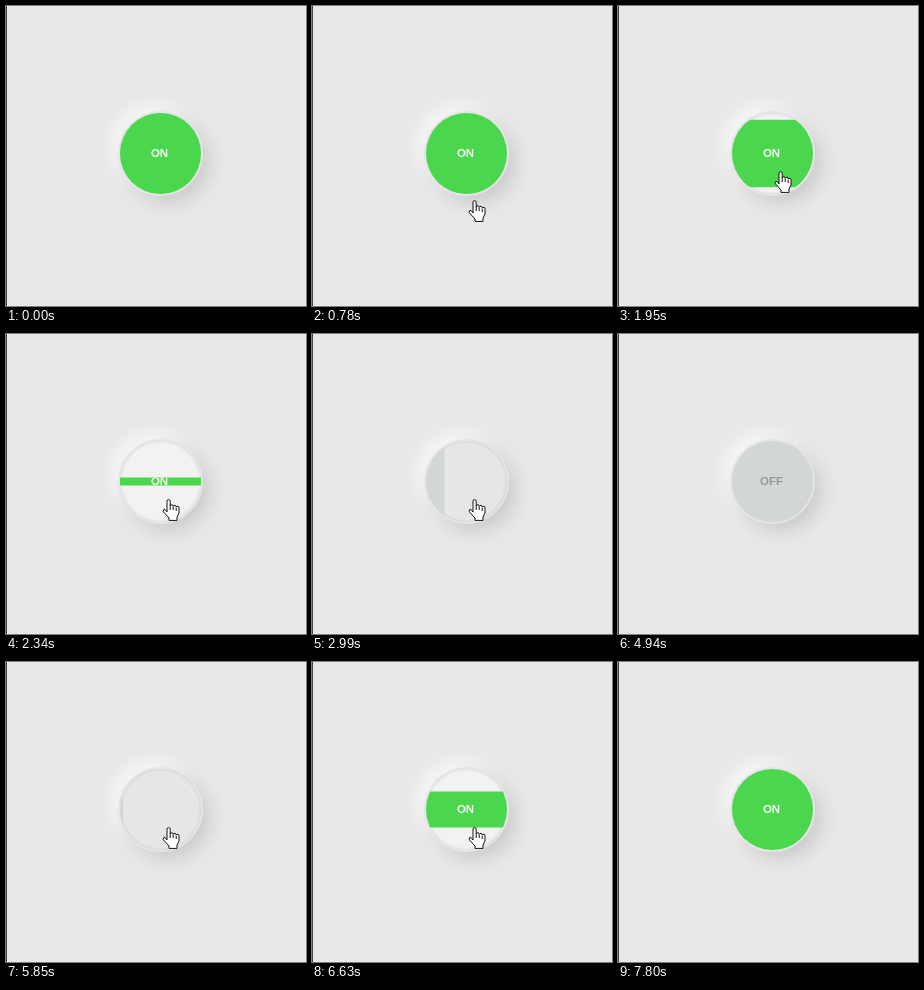
Recreate the animation shown at these times as an HTML page. Size 300x300 px, loop 7.93 s.

```html
<!DOCTYPE html>
<html lang="en">
<head>
<meta charset="utf-8">
<title>Soft toggle button</title>
<style>
  html, body { margin: 0; width: 100%; height: 100%; overflow: hidden; background: #e8e8e8; }
  #edge { position: absolute; left: 0; top: 0; width: 1px; height: 100%; background: #444; }
  #button {
    position: absolute; left: 114px; top: 107px; width: 81px; height: 81px; border-radius: 50%;
    box-shadow: 0 0 0 2px #e4e5e4, 8px 8px 20px rgba(0, 0, 0, .14), -8px -8px 20px rgba(255, 255, 255, .7);
  }
  .face {
    position: absolute; inset: 0; border-radius: 50%; text-align: center; text-indent: -2px;
    font: bold 11.5px/81px "Liberation Sans", Arial, sans-serif;
  }
  #base { box-shadow: inset 0 0 3px rgba(0, 0, 0, .14); }
  #on { background: #4ad74d; color: #f4fff4; }
  #off { background: #d2d6d5; color: #969a99; }
  #hand { position: absolute; left: 0; top: 0; overflow: visible; }
</style>
</head>
<body>
<div id="edge"></div>
<div id="button">
  <div class="face" id="base"></div>
  <div class="face" id="off">OFF</div>
  <div class="face" id="on">ON</div>
</div>
<svg id="hand" width="18" height="22" stroke="#111" stroke-linejoin="round">
  <path fill="#fff" d="M5 13V2.2a1.6 1.6 0 0 1 3.2 0V7a1.5 1.5 0 0 1 3 .5a1.5 1.5 0 0 1 3 .8a1.4 1.4 0 0 1 2.8 .9V14L15 18v3.4H7V19L1.2 12.6Q.8 10 3 10.4Z"/>
  <path fill="none" d="M8.2 7v4M11.2 8v3M14.2 9v3"/>
</svg>
<script>
  const LOOP = 7930, STEP = 130, SLIDE = 800;
  const [base, on, off, hand] = ['base', 'on', 'off', 'hand'].map(id => document.getElementById(id));

  const ramp = (t, start, length) => Math.min(1, Math.max(0, (t - start) / length));
  const mix = (a, b, p) => a + (b - a) * p;

  // The CSS "ease" curve, cubic-bezier(.25, .1, .25, 1)
  const bezier = (a, b, u) => 3 * a * u * (1 - u) ** 2 + 3 * b * u * u * (1 - u) + u ** 3;
  function ease(x) {
    let low = 0, high = 1;
    for (let i = 0; i < 20; i++) {
      const mid = (low + high) / 2;
      if (bezier(.25, .25, mid) < x) low = mid; else high = mid;
    }
    return bezier(.1, 1, high);
  }
  const slide = (t, start) => ease(ramp(t, start, SLIDE));

  function handAt(t) {
    if (t < 390 || t >= 7410 || (t >= 4940 && t < 5330)) return null;
    if (t < 6890) {
      const left = (1 - ramp(t, 390, 780)) ** 2;
      return [156, 165 + 115 * left];
    }
    const gone = ramp(t, 6890, 390) ** 2;
    return [156 - 58 * gone, 165 + 82 * gone];
  }

  function draw(now) {
    const t = Math.floor(now % LOOP / STEP) * STEP;

    const green = 1 - slide(t, 1838) + slide(t, 6416);
    const grey = slide(t, 2854) - slide(t, 5250);
    on.style.clipPath = `inset(${50 * (1 - green)}% 0)`;
    off.style.clipPath = `inset(0 ${100 * (1 - grey)}% 0 0)`;

    const dim = ramp(t, 2600, 250) - ramp(t, 6050, 350);
    const tint = mix(242, 231, dim);
    base.style.background = `rgb(${mix(242, 229, dim)}, ${tint}, ${tint})`;

    const spot = handAt(t);
    hand.style.visibility = spot ? 'visible' : 'hidden';
    if (spot) hand.style.transform = `translate(${spot.map(Math.round).join('px, ')}px)`;

    requestAnimationFrame(() => draw(performance.now() - begin));
  }
  const begin = performance.now();
  draw(0);
</script>
</body>
</html>
```
